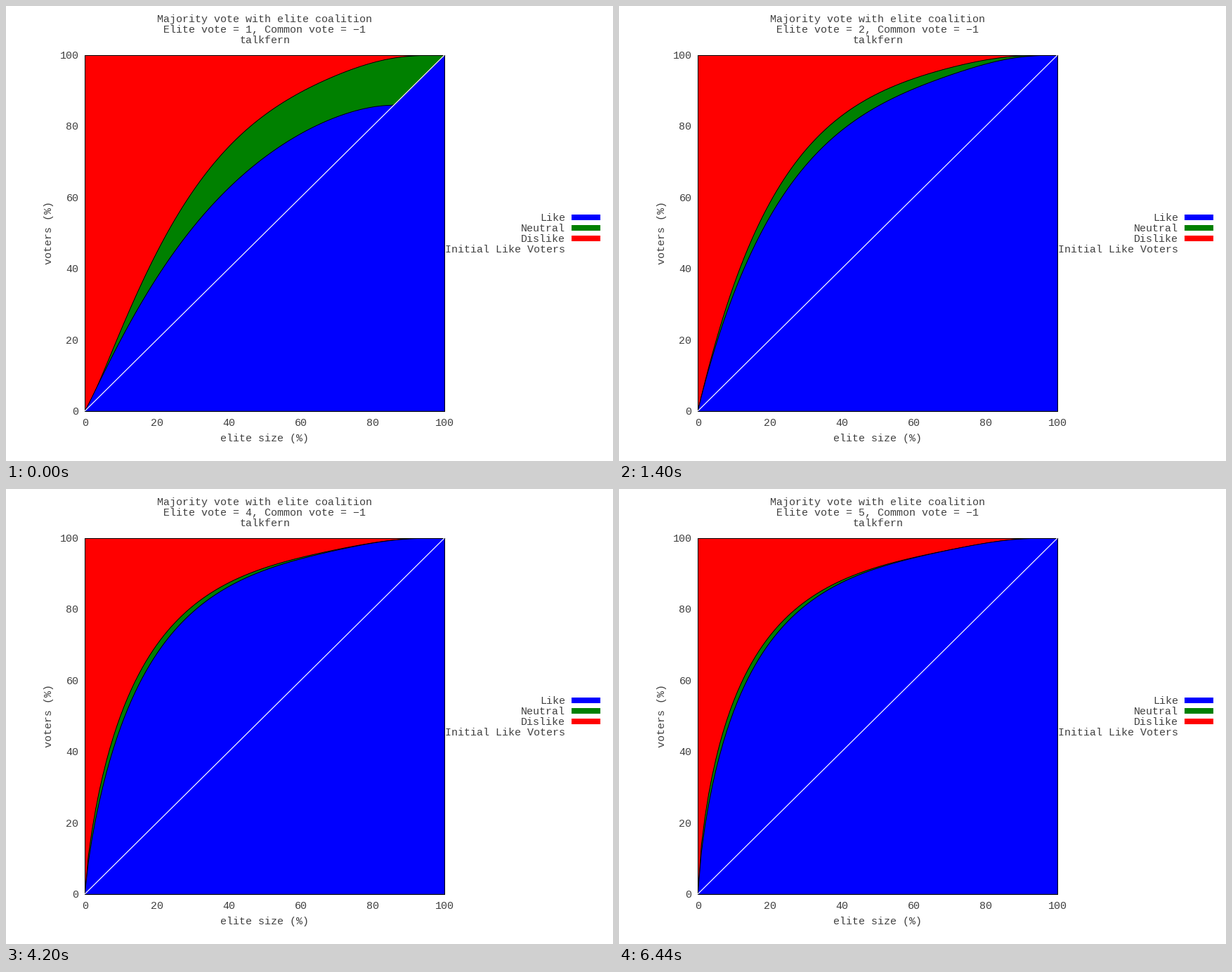
A matplotlib script for the animation above (7000 ms loop, 864 by 648 pixels).

```python
import numpy as np
import matplotlib.pyplot as plt
from matplotlib.animation import FuncAnimation
from matplotlib.patches import Rectangle

W, H, DPI = 864, 648, 72
LEFT, RIGHT, TOP, BOTTOM = 112.2, 624.2, 69.8, 576.8
BLUE, GREEN, RED = "#0000ff", "#008000", "#ff0000"
SIZES = np.arange(101)

plt.rcParams.update({"font.family": "Liberation Mono", "font.size": 15,
                     "text.color": "#404040"})


def fade(limit, swing, ratio, vote):
    """Approach a limit geometrically as the elite vote grows."""
    return limit + swing * ratio ** (vote - 1)


def share(level, power, tail=1):
    """Voter share (%) that saturates with elite size, never below the diagonal."""
    u = level * (SIZES / 50) ** power + tail * (SIZES / 83) ** 9
    return np.maximum(100 * (1 - np.exp(-u)), SIZES)


def like_share(vote):
    return share(fade(2.52, -1.27, 0.465, vote), fade(0.3, 0.77, 0.88, vote),
                 fade(1, -1.2, 0.12, vote))


def not_dislike_share(vote):
    return share(fade(2.52, -0.75, 0.41, vote), fade(0.58, 0.62, 0.69, vote))


fig = plt.figure(figsize=(W / DPI, H / DPI), dpi=DPI, facecolor="white")


def label(x, y, text, ha="center", va="baseline", **kw):
    return fig.text(x / W, 1 - y / H, text, ha=ha, va=va, **kw)


class Area:
    """Filled region under a curve with a thin black outline on top."""

    def __init__(self, color):
        self.fill, = ax.fill([0], [0], color=color, lw=0)
        self.line, = ax.plot([], [], color="black", lw=1)

    def set(self, y):
        self.line.set_data(SIZES, y)
        self.fill.set_xy(np.vstack([np.column_stack([SIZES, y]), [100, 0], [0, 0]]))


ax = fig.add_axes([LEFT / W, 1 - BOTTOM / H, (RIGHT - LEFT) / W, (BOTTOM - TOP) / H],
                  facecolor=RED)
neutral, like = Area(GREEN), Area(BLUE)
for z, artist in enumerate([neutral.fill, neutral.line, like.fill, like.line]):
    artist.set_zorder(1 + 0.1 * z)
ax.plot([0, 100], [0, 100], color="white", lw=1.2, zorder=5)
ax.set(xlim=(0, 100), ylim=(0, 100), xticks=[], yticks=[])
for spine in ax.spines.values():
    spine.set_linewidth(1)

mid = (LEFT + RIGHT) / 2
label(mid, 23, "Majority vote with elite coalition")
votes = label(mid, 38, "")
label(mid, 53, "talkfern")
label(mid, 620, "elite size (%)")
label(61, 323, "voters (%)", va="center", rotation=90)

for v in range(0, 101, 20):
    label(LEFT + (RIGHT - LEFT) * v / 100, 598, str(v))
    label(103.5, BOTTOM - (BOTTOM - TOP) * v / 100 + 5.2, str(v), ha="right")

legend = [("Like", BLUE), ("Neutral", GREEN), ("Dislike", RED),
          ("Initial Like Voters", "white")]
for k, (name, color) in enumerate(legend):
    y = 306 + 15 * k
    label(796, y, name, ha="right")
    fig.add_artist(Rectangle((805 / W, 1 - (y - 1) / H), 41 / W, 8 / H, fc=color, ec="none"))


def update(i):
    vote = i + 1
    neutral.set(not_dislike_share(vote))
    like.set(like_share(vote))
    votes.set_text(f"Elite vote = {vote}, Common vote = \u22121")
    return neutral.fill, neutral.line, like.fill, like.line, votes


anim = FuncAnimation(fig, update, frames=5, interval=1400, repeat=True,
                     repeat_delay=0, blit=False)
plt.show()
```
